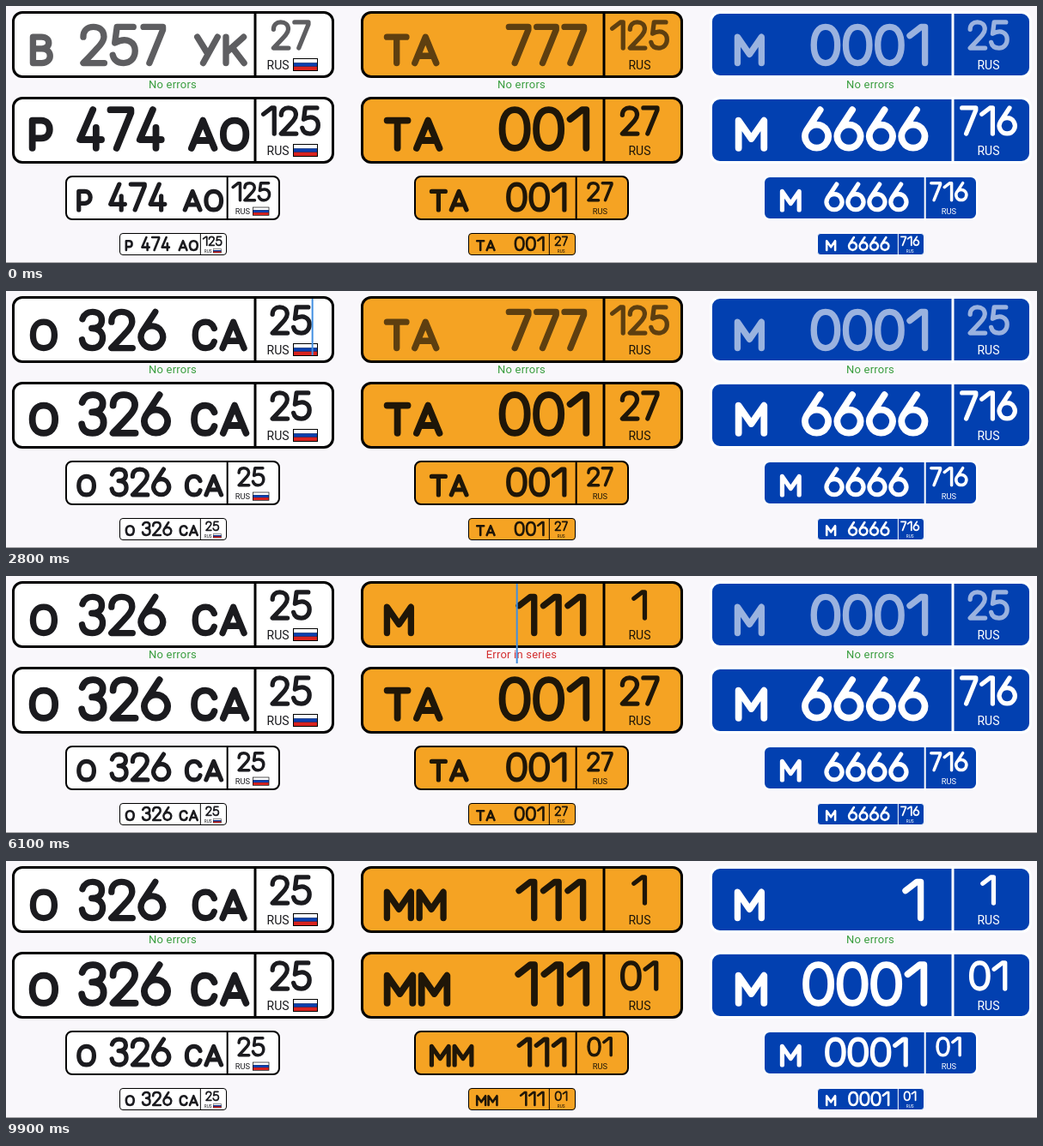
An HTML page for the animation above (10 s loop, 1200 by 300 pixels).

```html
<!DOCTYPE html>
<html lang="en">
<head>
<meta charset="utf-8">
<title>Plate number fields</title>
<style>
  html, body { margin: 0; width: 100%; height: 100%; overflow: hidden; background: #f9f7fb; }
  svg { display: block; width: 1200px; height: 300px; font-family: Roboto, sans-serif; }
  .glyphs { fill: none; stroke-width: 15; stroke-linecap: round; stroke-linejoin: round; }
</style>
</head>
<body>
<svg id="stage" viewBox="0 0 1200 300"></svg>
<script>
const LOOP = 10000, STEP = 100, GAP = 6;

// Plate lettering on a 100-unit height: [width, stroke path]. Letters are lower than digits.
const GLYPHS = {
  0: [70, 'M35 7C53 7 63 24 63 50S53 93 35 93 7 76 7 50 17 7 35 7Z'],
  1: [52, 'M7 28L34 7H43V93'],
  2: [65, 'M8 31C8 15 18 7 32 7S57 15 57 30C57 42 50 49 8 93H58'],
  3: [63, 'M8 24C12 12 20 7 32 7C46 7 54 15 54 27S45 46 30 46C47 46 56 55 56 69S46 93 31 93C18 93 9 87 7 73'],
  4: [62, 'M36 7L7 74H55M43 47V93'],
  5: [67, 'M56 7H17L12 45C42 29 60 45 60 64C60 82 48 93 33 93C19 93 10 87 7 74'],
  6: [66, 'M41 7L11.5 52M33 40.5a26 26 0 1 0 .1 0Z'],
  7: [60, 'M7 7H53V14L21 93'],
  'А': [65, 'M7 93L32.5 31 58 93M15 76H50'],
  'В': [54, 'M7 59H28C50 59 50 31 27 31H7V93H28C54 93 54 59 28 59'],
  'К': [57, 'M7 31V93M49 31L8 68M22 56L50 93'],
  'М': [71, 'M7 93V31L35.5 72 64 31V93'],
  'О': [65, 'M32.5 31C48 31 58 43 58 62S48 93 32.5 93 7 81 7 62 17 31 32.5 31Z'],
  'Р': [53, 'M7 93V31H27C52 31 52 71 27 71H7'],
  'С': [59, 'M52 46C48 36 41 31 32 31C16 31 7 43 7 62S16 93 32 93C42 93 49 88 52 78'],
  'Т': [60, 'M7 31H53M30 31V93'],
  'У': [62, 'M7 31L31 70M55 31L21 93']
};

// Fields: a = first series, n = number, b = second series, r = region.
const PLATES = [
  { x: 0, fill: '#fff', edge: '#000', ink: '#1b1b1f', fade: .7, flag: true, digits: 3,
    left: 21, numRight: 179, serRight: 273.5, rowLeft: 20, rowRight: 276,
    hint: { a: 'В', n: '257', b: 'УК', r: '27' }, row: { a: 'Р', n: '474', b: 'АО', r: '125' } },
  { x: 406, fill: '#f5a323', edge: '#000', ink: '#1f1608', fade: .7, digits: 3,
    left: 27, numRight: 263, rowLeft: 27, rowRight: 267,
    hint: { a: 'ТА', n: '777', r: '125' }, row: { a: 'ТА', n: '001', r: '27' } },
  { x: 812, fill: '#0240b0', edge: '#fff', ink: '#fff', fade: .6, digits: 4,
    left: 29, numRight: 250, hintShift: 5, rowLeft: 30, rowRight: 254,
    hint: { a: 'М', n: '0001', r: '25' }, row: { a: 'М', n: '6666', r: '716' } }
];

// [time, plate, field, text, characters right of the caret]; no field means focus is lost.
const EVENTS = [
  [300, 0, 'a', ''], [700, 0, 'a', 'О'], [900, 0, 'n', ''], [1100, 0, 'n', '3'],
  [1300, 0, 'n', '32'], [1500, 0, 'n', '326'], [1700, 0, 'b', ''], [2000, 0, 'b', 'С'],
  [2200, 0, 'b', 'СА'], [2300, 0, 'r', ''], [2600, 0, 'r', '2'], [2800, 0, 'r', '25'], [3200, 0],
  [3400, 1, 'a', ''], [3600, 1, 'a', 'М'], [3800, 1, 'n', ''], [3900, 1, 'n', '1'],
  [4000, 1, 'n', '11'], [4300, 1, 'n', '111'], [4500, 1, 'r', ''], [4900, 1, 'r', '1'],
  [5700, 1, 'n', '111'], [5800, 1, 'n', '111', 1], [5900, 1, 'n', '111', 2],
  [6000, 1, 'n', '111', 3], [6300, 1, 'a', 'М'], [6700, 1, 'a', 'ММ'], [7000, 1],
  [7400, 2, 'a', ''], [7900, 2, 'a', 'М'], [8000, 2, 'n', ''], [8200, 2, 'n', '1'],
  [8900, 2, 'r', ''], [9200, 2, 'r', '1'], [9700, 2]
];

const ROWS = [[7, 106, 1], [69, 198, 2 / 3], [132, 265, 1 / 3]];
const REGION_X = 324.5, REGION_Y = 10.5, REGION_SIZE = .35;
const FIELD_Y = 15, FIELD_SIZE = .49, ROW_Y = 11.5, ROW_SIZE = .52;

const textWidth = (text, size) =>
  text ? size * ([...text].reduce((sum, c) => sum + GLYPHS[c][0] + GAP, 0) - GAP) : 0;

// align: 0 = start, .5 = middle, 1 = end
function word(text, x, y, size, align, ink, opacity = 1) {
  let pen = 0;
  const paths = [...text].map(c => {
    const [width, d] = GLYPHS[c];
    const path = `<path transform="translate(${pen})" d="${d}"/>`;
    pen += width + GAP;
    return path;
  }).join('');
  const start = x - textWidth(text, size) * align;
  return `<g class="glyphs" role="img" aria-label="${text}" stroke="${ink}" opacity="${opacity}"
    transform="translate(${start} ${y}) scale(${size})">${paths}</g>`;
}

function base(p) {
  const label = (x, anchor) =>
    `<text x="${x}" y="68" font-size="14" text-anchor="${anchor}" fill="${p.ink}">RUS</text>`;
  const flag = `<path d="M327 55h29v15h-29z" fill="#000"/><path d="M328 56h27v4.4h-27z" fill="#fff"/>
    <path d="M328 60.4h27v4.3h-27z" fill="#0b3fae"/><path d="M328 64.7h27v4.3h-27z" fill="#d8231f"/>`;
  return `<rect x="1.5" y="1.5" width="372" height="75" rx="10.5" fill="${p.fill}" stroke="${p.edge}" stroke-width="3"/>
    <path d="M283 2V76" stroke="${p.edge}" stroke-width="3"/>` +
    (p.flag ? label(296.5, 'start') + flag : label(REGION_X, 'middle'));
}

function inputPlate(p, typed) {
  const field = (key, x, y, size, align) => {
    const text = typed[key], hint = p.hint[key];
    if (!hint) return '';
    return text ? word(text, x, y, size, align, p.ink)
      : word(hint, key === 'n' ? x + (p.hintShift || 0) : x, y, size, align, p.ink, p.fade);
  };
  return base(p) + field('a', p.left, FIELD_Y, FIELD_SIZE, 0) + field('n', p.numRight, FIELD_Y, FIELD_SIZE, 1) +
    field('b', p.serRight, FIELD_Y, FIELD_SIZE, 1) + field('r', REGION_X, REGION_Y, REGION_SIZE, .5);
}

function resultPlate(p, v) {
  const width = text => textWidth(text, ROW_SIZE);
  const put = (text, x, align) => word(text, x, ROW_Y, ROW_SIZE, align, p.ink);
  let numbers = put(v.n, p.rowRight, 1);
  if (v.b) {
    const gap = (p.rowRight - p.rowLeft - width(v.a) - width(v.n) - width(v.b)) / 2;
    numbers = put(v.n, p.rowLeft + width(v.a) + gap, 0) + put(v.b, p.rowRight, 1);
  }
  return base(p) + put(v.a, p.rowLeft, 0) + numbers + word(v.r, REGION_X, REGION_Y, REGION_SIZE, .5, p.ink);
}

function status(t, i, error) {
  if (i === 1 && t >= 7500) return '';
  return `<text x="187" y="90" font-size="13" letter-spacing=".2" text-anchor="middle"
    fill="${error ? '#d32f2f' : '#3a9e3f'}">${error ? 'Error in series' : 'No errors'}</text>`;
}

function caret(t, [time, i, key, text, after = 0]) {
  if (!key) return '';
  const phase = (t - time) % 1000;
  const opacity = phase < 400 ? 1 : phase < 500 ? .45 : phase < 900 ? 0 : .45;
  const p = PLATES[i], region = key === 'r';
  const tail = after ? textWidth(text.slice(-after), FIELD_SIZE) : 0;
  const x = 1 + {
    a: p.left + textWidth(text, FIELD_SIZE),
    n: p.numRight - tail,
    b: p.serRight,
    r: REGION_X + textWidth(text, REGION_SIZE) / 2
  }[key];
  return `<path d="M${x} 3V${region ? 69 : 96}" transform="translate(${7 + p.x} 6)"
    stroke="#4290e2" stroke-width="2" opacity="${opacity}"/>`;
}

function pointer(t) {
  if (t < 7000 || t >= 7400) return '';
  const k = (t - 7100) / 300;
  const d = 'M-3.5 -7Q0 -7 0 -5Q0 -7 3.5 -7M0 -5V5M-3.5 7Q0 7 0 5Q0 7 3.5 7M-2 2H2';
  return `<g transform="translate(${929 - 61 * k} ${34 + 14 * k})" fill="none">
    <path d="${d}" stroke="#fff" stroke-width="3"/><path d="${d}" stroke="#222"/></g>`;
}

function render(t) {
  const typed = PLATES.map(() => ({}));
  const results = PLATES.map(p => p.row);
  const errors = PLATES.map(() => false);
  let last = [0, 0];
  for (const event of EVENTS) {
    const [time, i, key, text] = event;
    if (time > t) break;
    last = event;
    if (!key) continue;
    const v = typed[i], p = PLATES[i];
    v[key] = text;
    if (!v.r) continue;
    errors[i] = v.a.length < p.hint.a.length;
    if (!errors[i]) {
      results[i] = { ...v, n: v.n.padStart(p.digits, '0'), r: v.r.padStart(2, '0') };
    }
  }
  const place = (x, y, scale, body) => `<g transform="translate(${x} ${y}) scale(${scale})">${body}</g>`;
  return PLATES.map((p, i) =>
    place(7 + p.x, 6, 1, inputPlate(p, typed[i]) + status(t, i, errors[i])) +
    ROWS.map(([x, y, scale]) => place(x + p.x, y, scale, resultPlate(p, results[i]))).join('')
  ).join('') + '<path d="M0 299.5H1200" stroke="#a3a2a5"/>' + caret(t, last) + pointer(t);
}

const stage = document.getElementById('stage');
const start = performance.now();
let shown = -1;
function tick() {
  const t = Math.floor((performance.now() - start) % LOOP / STEP) * STEP;
  if (t !== shown) {
    stage.innerHTML = render(t);
    shown = t;
  }
  requestAnimationFrame(tick);
}
tick();
</script>
</body>
</html>
```
